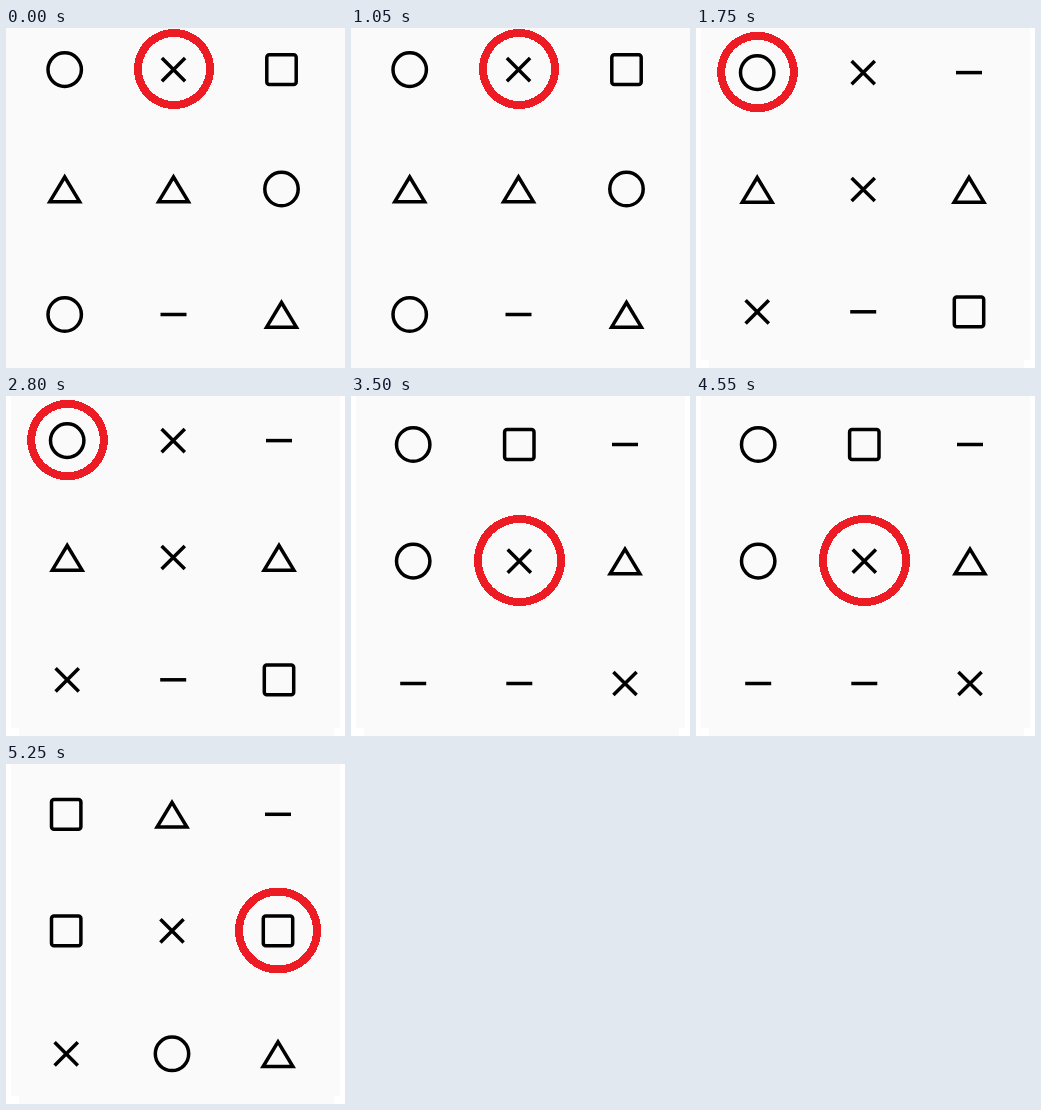
Recreate the animation shown at these times as an HTML page with a canvas. Size 339x340 px, loop 7 s.

```html
<!DOCTYPE html>
<html lang="en">
<head>
<meta charset="utf-8">
<style>
  html, body { margin: 0; width: 100%; height: 100%; overflow: hidden; background: #fff; }
  canvas { display: block; }
</style>
</head>
<body>
<canvas id="stage" width="339" height="340"></canvas>
<script>
const ctx = document.getElementById('stage').getContext('2d');
const HOLD = 1750;

// Marks run row by row: o circle, x cross, s square, t triangle, d dash.
const scenes = [
  { marks: 'oxsttoodt', cols: [58.7, 167.5, 275.5], rows: [41.6, 161, 286.5], ring: [168, 41, 40, 40], full: true },
  { marks: 'oxdtxtxds', cols: [61.2, 167.2, 273], rows: [44.6, 161.5, 283.8], ring: [61.5, 44, 40.3, 40.2] },
  { marks: 'osdoxtddx', cols: [62.2, 168.3, 274], rows: [48.5, 165.1, 287.5], ring: [168.5, 164.5, 45.5, 45.5] },
  { marks: 'stdsxsxot', cols: [60.2, 166, 272], rows: [50.3, 166.8, 289.8], ring: [272, 166.5, 43, 43] }
];

const draw = {
  o(x, y) { ctx.ellipse(x, y, 16.7, 16.8, 0, 0, Math.PI * 2); },
  x(x, y) {
    const r = 11.6;
    ctx.moveTo(x - r, y - r); ctx.lineTo(x + r, y + r);
    ctx.moveTo(x + r, y - r); ctx.lineTo(x - r, y + r);
  },
  s(x, y) { ctx.roundRect(x - 14.7, y - 14.9, 29.4, 29.8, 2.5); },
  t(x, y) {
    ctx.moveTo(x, y - 12);
    ctx.lineTo(x + 14.9, y + 12.7);
    ctx.lineTo(x - 14.9, y + 12.7);
    ctx.closePath();
  },
  d(x, y) { ctx.moveTo(x - 13, y); ctx.lineTo(x + 13, y); }
};

// Hard-edged ring, filled one pixel row at a time.
function drawRing([cx, cy, rx, ry], width) {
  const half = (y, a, b) => a * Math.sqrt(Math.max(0, 1 - ((y + 0.5 - cy) / b) ** 2));
  ctx.fillStyle = '#ed1c24';
  for (let y = Math.floor(cy - ry); y < cy + ry; y++) {
    const outer = half(y, rx, ry);
    const inner = half(y, rx - width, ry - width);
    const [a, b, c, d] = [cx - outer, cx - inner, cx + inner, cx + outer].map(Math.round);
    ctx.fillRect(a, y, b - a, 1);
    ctx.fillRect(c, y, d - c, 1);
  }
}

function paint({ marks, cols, rows, ring, full }) {
  ctx.fillStyle = '#fff';
  ctx.fillRect(0, 0, 339, 340);
  ctx.fillStyle = '#fafafa';
  if (full) {
    ctx.fillRect(0, 0, 339, 340);
  } else {
    ctx.fillRect(5, 0, 329, 332);
    ctx.fillRect(13, 332, 315, 8);
  }

  ctx.strokeStyle = '#000';
  ctx.lineWidth = 3.5;
  ctx.filter = 'blur(0.6px)';
  ctx.beginPath();
  [...marks].forEach((mark, i) => draw[mark](cols[i % 3], rows[Math.floor(i / 3)]));
  // Each ellipse continues the current path, so marks are stroked one by one.
  ctx.beginPath();
  [...marks].forEach((mark, i) => {
    ctx.beginPath();
    draw[mark](cols[i % 3], rows[Math.floor(i / 3)]);
    ctx.stroke();
  });
  ctx.filter = 'none';

  drawRing(ring, 8);
}

const start = performance.now();
let shown = -1;
function tick() {
  const t = Math.max(0, performance.now() - start);
  const index = Math.floor(t / HOLD) % scenes.length;
  if (index !== shown) paint(scenes[shown = index]);
  requestAnimationFrame(tick);
}
tick();
</script>
</body>
</html>
```
